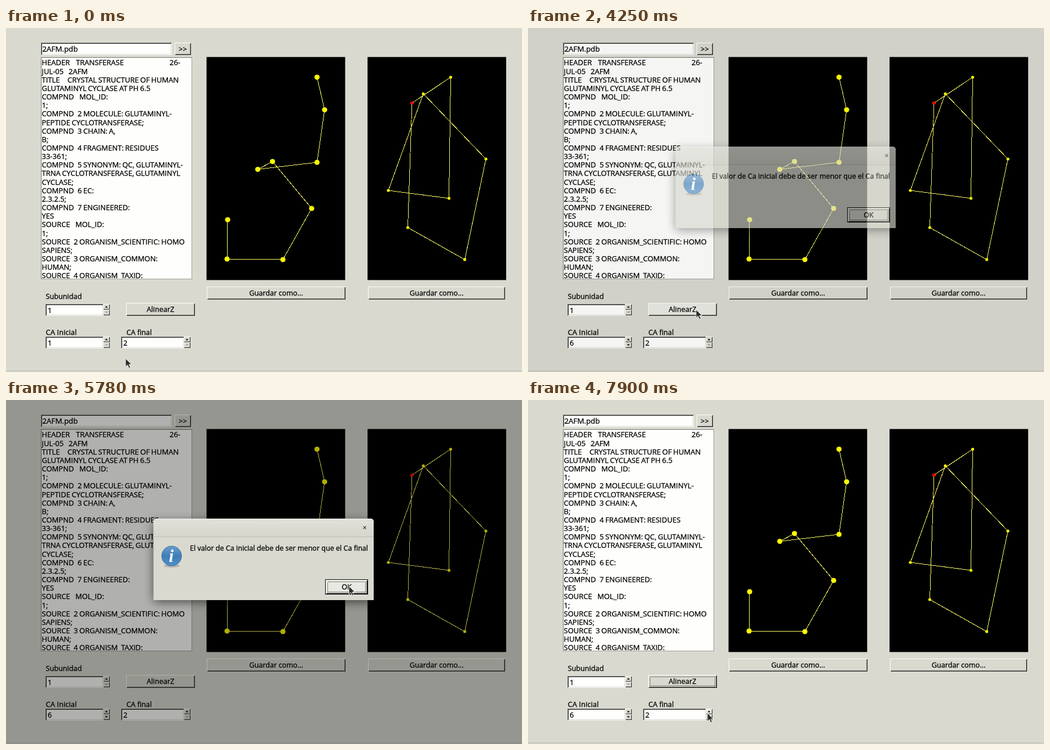
An HTML page that plays this animation: 915 by 612 pixels, repeating every 8000 ms.

```html
<!DOCTYPE html>
<html lang="es">
<head>
<meta charset="utf-8">
<title>Alinear</title>
<style>
  html, body { margin: 0; width: 100%; height: 100%; overflow: hidden; background: #d9d9d0; }
  svg { display: block; width: 915px; height: 612px; }
  text {
    font-family: "Open Sans", "Noto Sans", sans-serif; font-size: 12.7px; white-space: pre;
    fill: #000; stroke: #000; stroke-width: .3px;
  }
  .list text { font-size: 13px; word-spacing: -.8px; }
  .crisp { shape-rendering: crispEdges; }
</style>
</head>
<body>
<svg id="stage" viewBox="0 0 915 612">
  <defs>
    <clipPath id="listClip"><rect x="63" y="53" width="266" height="392.5"/></clipPath>
    <linearGradient id="titleBar" x2="0" y2="1">
      <stop offset="0" stop-color="#e1e1da"/><stop offset="1" stop-color="#d5d5cc"/>
    </linearGradient>
    <linearGradient id="blue" x2="0" y2="1">
      <stop offset="0" stop-color="#6b9fcd"/><stop offset=".5" stop-color="#3f7db8"/><stop offset="1" stop-color="#4f8fc6"/>
    </linearGradient>
    <filter id="blur" x="-20%" y="-40%" width="140%" height="180%"><feGaussianBlur stdDeviation="9"/></filter>
  </defs>
</svg>
<script>
const LOOP = 8000;
const FACE = '#d9d9d0', HOVER = '#e9e9e3', PAPER = '#fefefc', DARK = '#222', LIGHT = '#fff', SHADE = '#85857e';
const stage = document.getElementById('stage');

function add(parent, tag, attrs = {}, content) {
  const node = document.createElementNS('http://www.w3.org/2000/svg', tag);
  for (const key in attrs) node.setAttribute(key, attrs[key]);
  if (content !== undefined) node.textContent = content;
  parent.appendChild(node);
  return node;
}
const group = (parent, attrs) => add(parent, 'g', attrs);
const label = (parent, x, y, content, attrs) => add(parent, 'text', { x, y, ...attrs }, content);
const rect = (parent, x, y, width, height, fill, attrs) =>
  add(parent, 'rect', { x, y, width, height, fill, class: 'crisp', ...attrs });
const show = (node, on) => node.setAttribute('visibility', on ? 'inherit' : 'hidden');

// One-pixel frame: a = top and left, b = bottom and right.
function bevel(parent, x, y, w, h, a, b) {
  const line = (points, stroke) =>
    add(parent, 'polyline', { points, stroke, fill: 'none', class: 'crisp' });
  const l = x + .5, t = y + .5, r = x + w - .5, d = y + h - .5;
  return [line(`${l},${d} ${l},${t} ${r},${t}`, a), line(`${l},${d} ${r},${d} ${r},${t}`, b)];
}

function focusRect(parent, x, y, w, h) {
  return add(parent, 'rect', {
    x: x + .5, y: y + .5, width: w - 1, height: h - 1, fill: 'none',
    stroke: '#222', 'stroke-dasharray': '1 1', class: 'crisp'
  });
}

function button(parent, x, y, w, h, caption) {
  const g = group(parent);
  const face = rect(g, x, y, w, h, FACE);
  const [topLeft, bottomRight] = bevel(g, x, y, w, h, LIGHT, DARK);
  const inner = bevel(g, x + 1, y + 1, w - 2, h - 2, 'none', SHADE);
  const text = label(g, x + w / 2, y + h / 2 + 4.7, caption, { 'text-anchor': 'middle' });
  return {
    g,
    set(hover, pressed) {
      face.setAttribute('fill', hover ? HOVER : FACE);
      topLeft.setAttribute('stroke', pressed ? DARK : LIGHT);
      bottomRight.setAttribute('stroke', pressed ? LIGHT : DARK);
      inner[1].setAttribute('stroke', pressed ? 'none' : SHADE);
      text.setAttribute('transform', pressed ? 'translate(1 1)' : '');
    }
  };
}

function entry(parent, x, y, w, h) {
  rect(parent, x, y, w, h, PAPER);
  bevel(parent, x, y, w, h, SHADE, LIGHT);
  bevel(parent, x + 1, y + 1, w - 2, h - 2, DARK, FACE);
}

function spinner(parent, x, y, w, value) {
  entry(parent, x, y, w - 11, 21);
  const text = label(parent, x + 4, y + 16, value);
  const left = x + w - 12, mid = left + 6;
  const half = (top, d) => {
    const face = rect(parent, left, top, 12, 10, FACE);
    bevel(parent, left, top, 12, 10, LIGHT, DARK);
    const arrow = add(parent, 'path', { d, fill: '#111' });
    return { face, arrow };
  };
  const up = half(y, `M${mid - 2.5} ${y + 6.5}h5l-2.5 -3z`);
  const down = half(y + 10, `M${mid - 2.5} ${y + 13.5}h5l-2.5 3z`);
  return { text, up, down };
}

function panel(parent, x) {
  add(parent, 'rect', { x: x - .4, y: 51.6, width: 245.8, height: 396.8, fill: '#000' });
}

function chain(parent, points, radius) {
  add(parent, 'polyline', {
    points: points.join(' '), fill: 'none', stroke: '#ffff66', class: 'crisp'
  });
  for (const [cx, cy] of points) add(parent, 'circle', { cx, cy, r: radius, fill: '#ff0' });
}

// Main window
const main = group(stage);
rect(main, 0, 0, 915, 612, FACE);
rect(main, 0, 610, 915, 1, '#aaaaa3');
rect(main, 0, 611, 915, 1, '#eeeeea');

entry(main, 62, 26, 232, 22);
label(main, 64.5, 42, '2AFM.pdb', { style: 'font-size:13.3px' });
button(main, 299, 26, 29, 22, '>>');

rect(main, 62, 52, 268, 395, PAPER);
bevel(main, 62, 52, 268, 395, '#77776f', '#a0a098');
const list = group(main, { class: 'list', 'clip-path': 'url(#listClip)' });
// "|x|" moves the text that follows to column x.
const lines = `HEADER|124|TRANSFERASE|290|26-
JUL-05|111|2AFM
TITLE|109|CRYSTAL STRUCTURE OF HUMAN
GLUTAMINYL CYCLASE AT PH 6.5
COMPND|130|MOL_ID:
1;
COMPND|127|2 MOLECULE: GLUTAMINYL-
PEPTIDE CYCLOTRANSFERASE;
COMPND|127|3 CHAIN: A,
B;
COMPND|127|4 FRAGMENT: RESIDUES
33-361;
COMPND|127|5 SYNONYM: QC, GLUTAMINYL-
TRNA CYCLOTRANSFERASE, GLUTAMINYL
CYCLASE;
COMPND|127|6 EC:
2.3.2.5;
COMPND|127|7 ENGINEERED:
YES
SOURCE|123|MOL_ID:
1;
SOURCE|120|2 ORGANISM_SCIENTIFIC: HOMO
SAPIENS;
SOURCE|120|3 ORGANISM_COMMON:
HUMAN;
SOURCE|120|4 ORGANISM_TAXID:`.split('\n');
lines.forEach((line, row) => {
  const parts = ['63.5', ...line.split('|')];
  for (let i = 0; i < parts.length; i += 2) label(list, parts[i], 66.4 + row * 15.16, parts[i + 1]);
});

panel(main, 356);
panel(main, 641.5);
chain(main, [[551.5, 87.5], [565, 145.5], [551.5, 239], [446.5, 251.5], [472.5, 237.5],
  [542, 321], [491, 412], [392, 411], [393, 341]], 4.6);
chain(main, [[720, 133.5], [788.5, 87.5], [785.5, 303], [678, 289], [740, 117],
  [851, 233], [813.5, 412], [712.5, 355], [720, 133.5]], 2.6);
add(main, 'circle', { cx: 720, cy: 133.5, r: 2.8, fill: '#f00' });

button(main, 356, 460, 246, 23, 'Guardar como...');
button(main, 642, 460, 243, 23, 'Guardar como...');
label(main, 70.5, 482, 'Subunidad');
label(main, 70.5, 546, 'CA Inicial', { style: 'font-size:13px' });
label(main, 213.5, 546, 'CA final');
const subunit = spinner(main, 70, 491, 114, '1');
const first = spinner(main, 70, 549, 114, '1');
const last = spinner(main, 204, 549, 123, '2');
for (const { down } of [subunit, last]) down.arrow.setAttribute('fill', '#a3a39b');
const caret = rect(main, 74, 552, 1, 16, '#111');
const align = button(main, 213, 489, 122, 23, 'AlinearZ');
const alignFocus = group(align.g);
bevel(alignFocus, 213, 489, 122, 23, '#fff', '#000');
focusRect(alignFocus, 216, 492, 116, 17);

const dim = rect(stage, 0, 0, 915, 612, '#000');

// Message box
const dialog = group(stage);
rect(dialog, 262, 217, 390, 142, '#000', { filter: 'url(#blur)', opacity: .6 });
add(dialog, 'path', { d: 'M261.5 356V217q0-6 6-6H646q6 0 6 6V356z', fill: FACE });
add(dialog, 'path', { d: 'M261.5 244V217q0-6 6-6H646q6 0 6 6V244z', fill: 'url(#titleBar)' });
add(dialog, 'path', { d: 'M262 217.5q0-6 6-6H645.5q6 0 6 6', fill: 'none', stroke: '#efefea' });
rect(dialog, 262, 243, 390, 1, '#bdbdb4');
add(dialog, 'path', { d: 'M633.5 224.5l5 5m0 -5l-5 5', stroke: '#444', 'stroke-width': 1.2 });
add(dialog, 'ellipse', { cx: 294, cy: 295, rx: 14, ry: 3, fill: '#000', opacity: .18 });
add(dialog, 'circle', { cx: 293.7, cy: 277.5, r: 17.5, fill: 'url(#blue)', stroke: '#34699c' });
label(dialog, 293, 288, 'i', {
  'text-anchor': 'middle',
  style: 'font:italic bold 31px "Liberation Serif",serif;fill:#fff;stroke:none'
});
label(dialog, 326, 267.5, 'El valor de Ca inicial debe de ser menor que el Ca final', { style: 'font-size:12.57px' });
rect(dialog, 566, 319, 76, 27, '#000');
const ok = button(dialog, 567, 320, 74, 25, 'OK');
focusRect(dialog, 570, 323, 68, 19);

const cursor = add(stage, 'path', {
  d: 'M0 0V14.5L3.4 11.4L6 17L8.5 15.8L6 10.6H10.6Z',
  fill: '#2c2c2c', stroke: '#e8e8e4', 'stroke-width': 1, 'stroke-linejoin': 'round'
});

// Pointer moves: start, end, number of steps, target
const moves = [
  [200, 750, 7, 174, 547],
  [900, 1050, 2, 175, 551],
  [2430, 2850, 5, 252, 540],
  [3300, 3600, 4, 297, 501],
  [3780, 3780, 1, 298, 501],
  [4500, 4850, 5, 508, 392],
  [5150, 5580, 5, 607, 331],
  [5780, 5780, 1, 608, 331],
  [6600, 6950, 5, 459, 422],
  [7050, 7250, 3, 383, 512],
  [7350, 7900, 7, 318, 557]
];
const clicks = [[1300, 1430], [1580, 1650], [1800, 1900], [2050, 2150], [2330, 2430]];

const within = (t, a, b) => t >= a && t < b;
const ramp = (t, a, b) => Math.min(1, Math.max(0, (t - a) / (b - a)));

function pointer(t) {
  let x = 212, y = 588;
  for (const [start, end, steps, toX, toY] of moves) {
    if (t < start) break;
    const done = t >= end ? 1 : (Math.floor((t - start) / (end - start) * (steps - 1)) + 1) / steps;
    x += (toX - x) * done;
    y += (toY - y) * done;
  }
  return [x, y];
}

function draw(t) {
  const [x, y] = pointer(t);
  cursor.setAttribute('transform', `translate(${x} ${y})`);
  const over = (l, top, r, b) => x >= l && x < r && y >= top && y < b;

  const count = 1 + clicks.filter(([down]) => t >= down).length;
  const held = clicks.some(([down, up]) => within(t, down, up));
  first.text.textContent = count;
  first.down.arrow.setAttribute('fill', count > 1 ? '#111' : '#a3a39b');
  const overFirst = over(172, 545, 184, 571);
  first.up.face.setAttribute('fill', held ? '#77776f' : overFirst ? HOVER : FACE);
  first.down.face.setAttribute('fill', held ? '#96968e' : FACE);
  last.up.face.setAttribute('fill', over(315, 549, 327, 560) ? HOVER : FACE);
  show(caret, within(t, 1300, 3500));

  const open = within(t, 4180, 6620);
  align.set(over(213, 489, 335, 512), within(t, 3980, 4180));
  show(alignFocus, t >= 6480);

  dim.setAttribute('opacity', .31 * ramp(t, 4190, 4750) * (1 - ramp(t, 6480, 6850)));
  show(dialog, open);
  dialog.setAttribute('opacity', ramp(t, 4160, 4300) * (1 - ramp(t, 6470, 6620)));
  ok.set(open && over(567, 320, 641, 345), within(t, 6280, 6480));
}

function tick(now) {
  draw(now % LOOP);
  requestAnimationFrame(tick);
}
draw(0);
requestAnimationFrame(tick);
</script>
</body>
</html>
```
